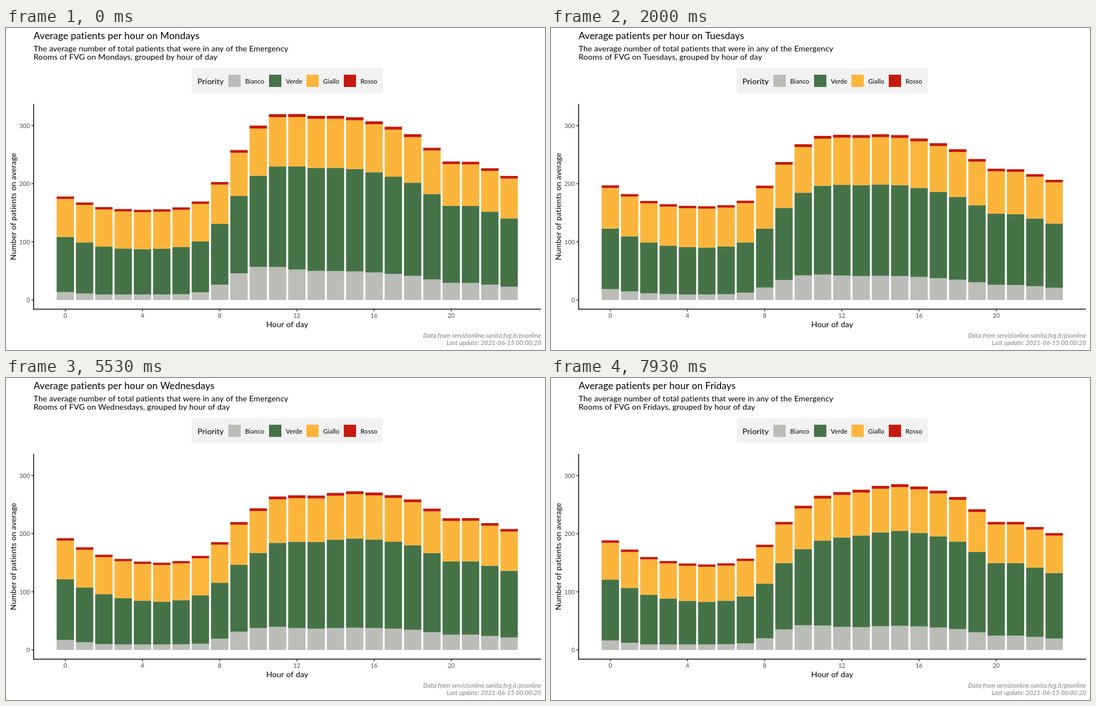
Write an HTML page with a canvas that moves like this. It is 967x579 px and loops after 8 s.

```html
<!DOCTYPE html>
<html lang="en">
<head>
<meta charset="utf-8">
<title>Average patients per hour</title>
<style>
html, body { margin: 0; width: 100%; height: 100%; overflow: hidden; background: #fff; }
canvas { display: block; }
</style>
</head>
<body>
<canvas id="stage" width="967" height="579"></canvas>
<script>
const ctx = document.getElementById("stage").getContext("2d");
const W = 967, H = 579, BASE = 489, STEP = 34.62, FIRST = 106.4;
const FPS = 15, PER_DAY = 30, TWEEN = 9, LOOP = 8000;
const PRIORITIES = [
  ["Bianco", "#bbbdb8", 399],
  ["Verde", "#457347", 472],
  ["Giallo", "#fcb53b", 539],
  ["Rosso", "#c61a0e", 606]
];

// Bar heights at a few key hours; rush lifts the morning Bianco, extra the Giallo.
const HOURS = [0, 2, 5, 7, 8, 9, 10, 11, 13, 15, 18, 20, 21, 23];
const days = [
  { name: "Mondays", rush: 13, extra: 0.5,
    keys: [186, 167, 163, 177, 212, 269.5, 313.5, 334, 331, 328.5, 298, 249, 248.5, 223] },
  { name: "Tuesdays", rush: 6, extra: 3.5,
    keys: [206, 178, 168.5, 178.5, 205.5, 248, 280, 295, 296.5, 296.5, 271, 236, 235, 216] },
  { name: "Wednesdays", rush: 7.5, extra: 0,
    keys: [201, 171, 156.5, 169, 193.5, 229, 253, 274.5, 276, 284, 270, 236.5, 236.5, 217.5] },
  { name: "Thursdays", rush: 11, extra: 1.7,
    keys: [200, 173.5, 160.5, 170.5, 196.5, 238, 270, 288, 292, 297, 276, 239.5, 241.5, 217.5] },
  { name: "Fridays", rush: 12, extra: -2.8,
    keys: [197, 167, 153.5, 164, 189, 230, 259, 277, 288, 298, 275, 230, 230, 210] }
];

// Smooth curve through the key hours.
function curve(keys, h) {
  const last = HOURS.length - 1;
  const slope = i => {
    const a = Math.max(0, i - 1), b = Math.min(last, i + 1);
    return (keys[b] - keys[a]) / (HOURS[b] - HOURS[a]);
  };
  let i = 0;
  while (i < last - 1 && h >= HOURS[i + 1]) i++;
  const d = HOURS[i + 1] - HOURS[i], t = (h - HOURS[i]) / d, s = 1 - t;
  return s * s * (1 + 2 * t) * keys[i] + t * t * (3 - 2 * t) * keys[i + 1]
    + d * t * s * (s * slope(i) - t * slope(i + 1));
}

// Upper edges of the stacked layers, bottom layer first.
function stack({ keys, rush, extra }, h) {
  const total = curve(keys, h), d = total - 162;
  const white = Math.max(10, 8 + 0.26 * d) + rush * Math.exp(-(((h - 9.5) / 1.8) ** 2));
  const yellow = 66 + extra + 0.06 * d + 0.0004 * d * d;
  const red = 3.2 + total / 150;
  return [white, total - red - yellow, total - red, total].map(v => BASE - v);
}

function rect(x, y, w, h, color) {
  ctx.fillStyle = color;
  ctx.fillRect(x, y, w, h);
}

function text(str, x, y, size, color = "#000", align = "left", style = "") {
  ctx.font = `${style} ${size}px Lato, "Open Sans", sans-serif`;
  ctx.letterSpacing = "0.1px";
  ctx.fillStyle = color;
  ctx.textAlign = align;
  ctx.fillText(str, x, y);
}

function drawHeader(name) {
  text("Average patients per hour on " + name, 49.5, 19.5, 17.3);
  text("The average number of total patients that were in any of the Emergency", 49.5, 42, 14.3);
  text(`Rooms of FVG on ${name}, grouped by hour of day`, 49.5, 57.3, 14.3);
}

function drawLegend() {
  ctx.fillStyle = "#f2f2f2";
  ctx.beginPath();
  ctx.roundRect(333, 72.5, 343, 44.5, 3);
  ctx.fill();
  text("Priority", 343.5, 101, 14.3);
  for (const [label, color, x] of PRIORITIES) {
    rect(x, 84, 22, 22, color);
    text(label, x + 30, 99.5, 11.4);
  }
}

function drawAxes() {
  rect(48.8, 136.5, 1.5, 369.7, "#000");
  rect(48.8, 504.8, 911, 1.5, "#000");
  for (let v = 0; v <= 300; v += 100) {
    const y = BASE - v * 1.045;
    rect(45.5, y - 0.75, 3.5, 1.5, "#333");
    text(v, 43, y + 4, 10.8, "#4d4d4d", "right");
  }
  for (let h = 0; h <= 20; h += 4) {
    const x = FIRST + h * STEP;
    rect(x - 0.75, 506, 1.5, 3.5, "#333");
    text(h, x, 521, 10.8, "#4d4d4d", "center");
  }
  text("Hour of day", 504.5, 537.5, 14.3, "#000", "center");
  ctx.save();
  ctx.translate(17.5, 321);
  ctx.rotate(-Math.PI / 2);
  text("Number of patients on average", 0, 0, 14, "#000", "center");
  ctx.restore();
}

function drawCaption() {
  text("Data from servizionline.sanita.fvg.it/psonline", 960, 557, 11.2, "#7f7f7f", "right", "italic");
  text("Last update: 2021-06-15 00:00:20", 960, 569.5, 11.2, "#7f7f7f", "right", "italic");
}

function drawBars(from, to, k) {
  const w = STEP * 0.9;
  for (let h = 0; h < 24; h++) {
    const a = stack(from, h), b = stack(to, h);
    let bottom = BASE;
    PRIORITIES.forEach(([, color], i) => {
      const top = a[i] + (b[i] - a[i]) * k;
      rect(FIRST + h * STEP - w / 2, top, w, bottom - top, color);
      bottom = top;
    });
  }
}

const ease = p => p < 0.5 ? 2 * p * p : 1 - 2 * (1 - p) ** 2;

function draw(ms) {
  const frame = Math.floor((ms % LOOP + 4) * FPS / 1000) % (LOOP * FPS / 1000);
  const i = Math.floor(frame / PER_DAY);
  const p = Math.max(0, (frame % PER_DAY - PER_DAY + TWEEN) / TWEEN);
  rect(0, 0, W, H, "#fff");
  drawHeader(days[p > 0.5 ? i + 1 : i].name);
  drawLegend();
  drawBars(days[i], days[i + 1], ease(p));
  drawAxes();
  drawCaption();
}

const start = performance.now();
function tick() {
  draw(performance.now() - start);
  requestAnimationFrame(tick);
}
tick();
</script>
</body>
</html>
```
